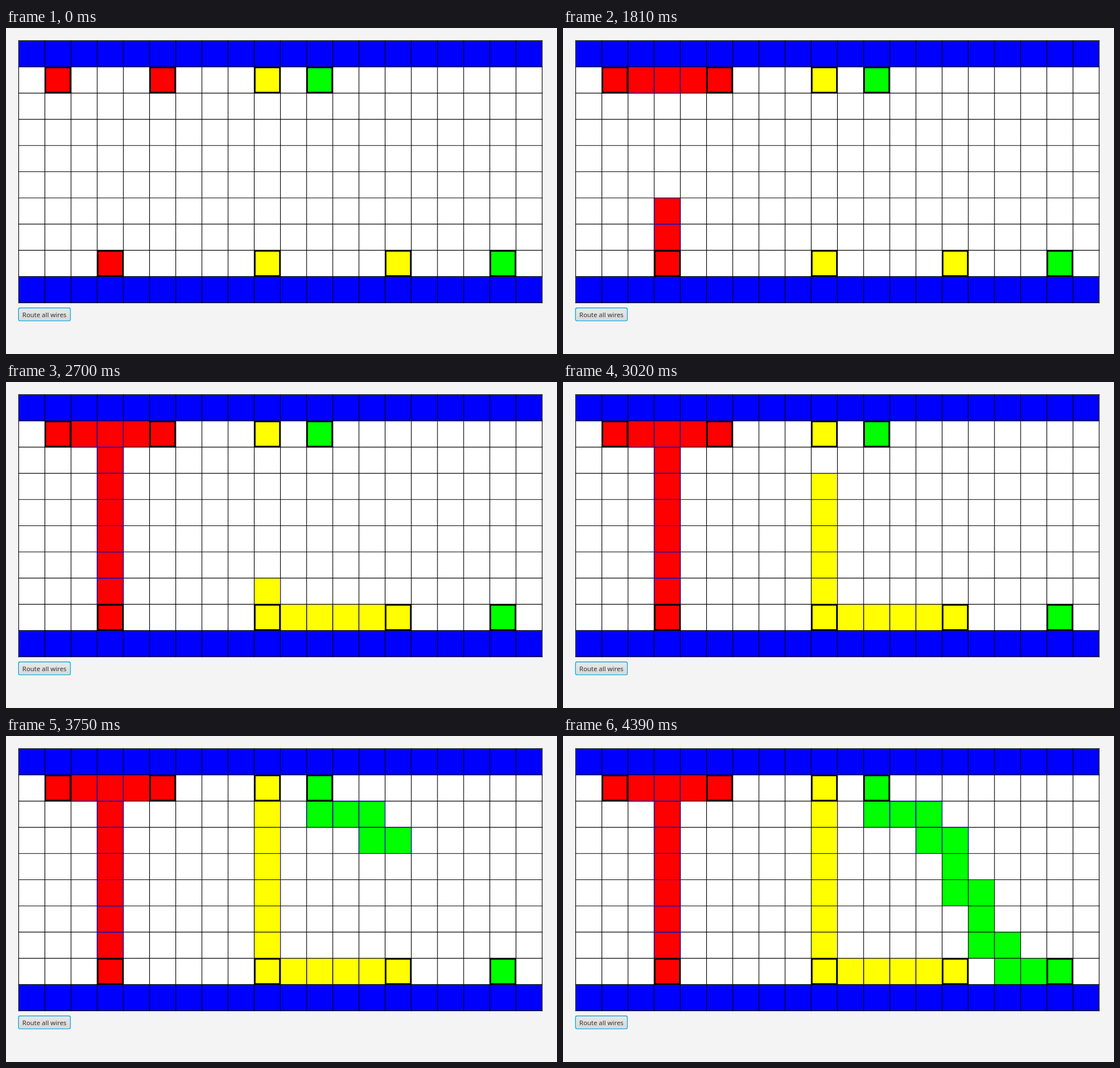
An HTML page with a canvas for the animation above (5880 ms loop, 973 by 575 pixels).

```html
<!DOCTYPE html>
<html lang="en">
<head>
<meta charset="utf-8">
<title>Wire routing</title>
<style>
  html, body { margin: 0; width: 100%; height: 100%; overflow: hidden; background: #f4f4f4; }
  canvas { display: block; }
</style>
</head>
<body>
<canvas id="stage" width="973" height="575"></canvas>
<script>
const ctx = document.getElementById('stage').getContext('2d');
const LOOP = 5880, PRESS = 1160, RELEASE = 1320;
const COLS = 20, ROWS = 10, CELL = 46.22, ORIGIN = 22.4;
const RED = '#ff0000', YELLOW = '#ffff00', GREEN = '#00ff00', BLUE = '#0000ff';
const EDGE = '#2412c8';
const MOVES = { L: [-1, 0], R: [1, 0], U: [0, -1], D: [0, 1] };

const pins = [
  [1, 1, RED], [5, 1, RED], [3, 8, RED],
  [9, 1, YELLOW], [9, 8, YELLOW], [14, 8, YELLOW],
  [11, 1, GREEN], [18, 8, GREEN]
];

// Wires in routing order: colour, first cell, moves, tinted sides.
const wires = [
  [RED, 4, 1, '', 'L'],
  [RED, 3, 1, 'L', 'LB'],
  [RED, 3, 7, 'UUUUU', 'LTRB'],
  [YELLOW, 13, 8, 'LLL', 'L'],
  [YELLOW, 9, 7, 'UUUUU', 'R'],
  [GREEN, 11, 2, 'RRDR', 'LTR'],
  [GREEN, 14, 4, 'DRDDRDR', '']
];

// Bursts of routed cells: first time, last time, count.
const bursts = [
  [1400, 1640, 4], [1810, 1960, 3], [2130, 2530, 6], [2700, 3100, 6],
  [3270, 3430, 3], [3600, 4150, 8], [4310, 4390, 2]
];

const times = bursts.flatMap(([from, to, count]) =>
  Array.from({ length: count }, (_, i) =>
    Math.round((from + (to - from) * i / (count - 1)) / 10) * 10));

const cells = wires.flatMap(([color, col, row, moves, sides]) => {
  const list = [{ color, col, row, sides }];
  for (const move of moves) {
    col += MOVES[move][0];
    row += MOVES[move][1];
    list.push({ color, col, row, sides });
  }
  return list;
});

const pos = i => ORIGIN + i * CELL;

function fillCells(col, row, width, height, color) {
  ctx.fillStyle = color;
  ctx.fillRect(pos(col), pos(row), width * CELL, height * CELL);
}

function line(col1, row1, col2, row2) {
  ctx.beginPath();
  ctx.moveTo(pos(col1), pos(row1));
  ctx.lineTo(pos(col2), pos(row2));
  ctx.stroke();
}

function drawGrid() {
  ctx.strokeStyle = '#000';
  ctx.lineWidth = 1.15;
  ctx.lineCap = 'square';
  for (let i = 0; i <= COLS; i++) line(i, 0, i, ROWS);
  for (let i = 0; i <= ROWS; i++) line(0, i, COLS, i);
}

function drawEdges({ col, row, sides }) {
  ctx.strokeStyle = EDGE;
  ctx.lineCap = 'butt';
  if (sides.includes('L')) line(col, row, col, row + 1);
  if (sides.includes('R')) line(col + 1, row, col + 1, row + 1);
  if (sides.includes('T')) line(col, row, col + 1, row);
  if (sides.includes('B')) line(col, row + 1, col + 1, row + 1);
}

function drawPin([col, row, color]) {
  fillCells(col, row, 1, 1, color);
  ctx.strokeStyle = '#000';
  ctx.lineWidth = 2.8;
  ctx.strokeRect(pos(col) + 0.9, pos(row) + 0.9, CELL - 1.8, CELL - 1.8);
}

function roundRect(x, y, w, h, r, fill) {
  ctx.beginPath();
  ctx.roundRect(x, y, w, h, r);
  ctx.fillStyle = fill;
  ctx.fill();
}

function drawButton(pressed) {
  const face = ctx.createLinearGradient(0, 494, 0, 516);
  face.addColorStop(0, pressed ? '#d9d9d9' : '#e9e9e9');
  face.addColorStop(1, pressed ? '#c9c9c9' : '#d7d7d7');
  roundRect(21.2, 492.7, 93.4, 24.8, 3.5, '#c2e5f0');
  roundRect(21.6, 493.1, 92.6, 24, 3, '#1ba6d5');
  roundRect(23, 494.5, 89.8, 21.2, 2, pressed ? '#e4e4e4' : '#f5f5f5');
  roundRect(23.8, 495.3, 88.2, 19.6, 1.5, face);
  ctx.fillStyle = '#303030';
  ctx.font = '11.4px "Noto Sans", "Open Sans", sans-serif';
  ctx.textAlign = 'center';
  ctx.textBaseline = 'alphabetic';
  ctx.fillText('Route all wires', 67.8, 509.6);
}

function draw(t) {
  ctx.fillStyle = '#f4f4f4';
  ctx.fillRect(0, 0, 973, 575);
  fillCells(0, 0, COLS, ROWS, '#fff');
  fillCells(0, 0, COLS, 1, BLUE);
  fillCells(0, ROWS - 1, COLS, 1, BLUE);
  const routed = cells.filter((_, i) => t >= times[i]);
  routed.forEach(c => fillCells(c.col, c.row, 1, 1, c.color));
  drawGrid();
  routed.forEach(drawEdges);
  pins.forEach(drawPin);
  drawButton(t >= PRESS && t < RELEASE);
}

const start = performance.now();
function tick() {
  draw((performance.now() - start) % LOOP);
  requestAnimationFrame(tick);
}
tick();
</script>
</body>
</html>
```
